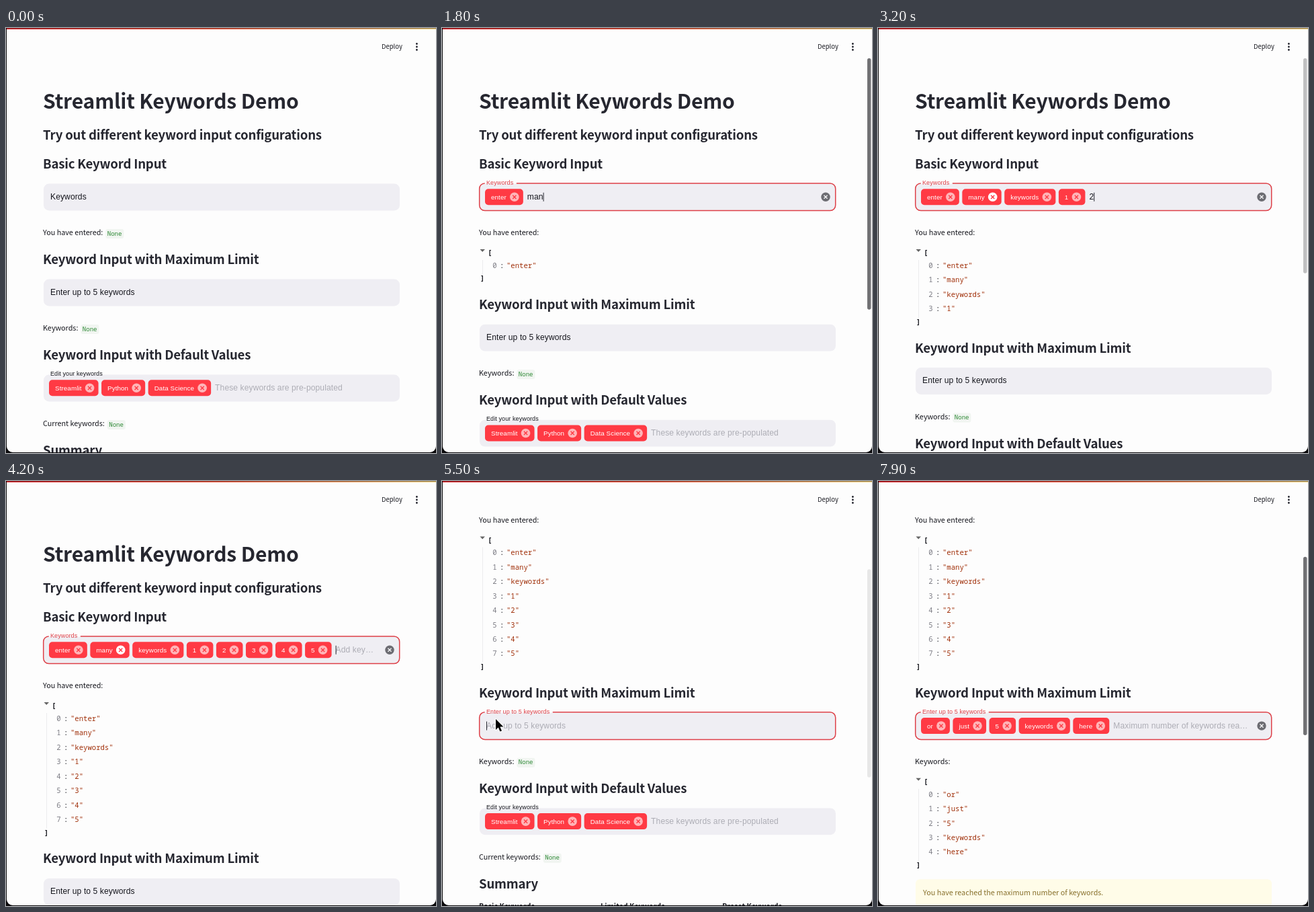
An HTML page with a canvas that plays this animation: 640x632 px, repeating every 8000 ms.

```html
<!DOCTYPE html>
<html lang="en">
<head>
<meta charset="utf-8">
<title>Keywords Demo</title>
<style>
  html, body { margin: 0; width: 100%; height: 100%; overflow: hidden; background: #000; }
  canvas { display: block; }
</style>
</head>
<body>
<canvas id="stage" width="640" height="632"></canvas>
<script>
const ctx = document.getElementById('stage').getContext('2d');
const W = 640, H = 632, LOOP = 8000;
const LEFT = 55, RIGHT = 586, ROW = 21.45;

const SANS = '"Noto Sans CJK JP", "Noto Sans CJK SC", "Noto Sans CJK KR", "Noto Sans", sans-serif';
const UI = '"Liberation Sans", Arial, sans-serif';
const MONO = '"Noto Sans Mono", "DejaVu Sans Mono", monospace';
const FONT = {
  title: ['bold 30px ' + SANS, -0.15],
  heading: ['bold 18.6px ' + SANS, -0.2],
  body: ['10.78px ' + SANS, 0],
  strong: ['bold 10.78px ' + SANS, 0],
  menu: ['9.43px ' + SANS, 0],
  input: ['12.05px ' + UI, 0.11],
  chip: ['9.8px ' + UI, 0.1],
  json: ['10.6px ' + MONO, 0],
  bracket: ['bold 10.6px ' + MONO, 0],
  code: ['9px ' + MONO, 0]
};
const INK = '#262730', DARK = '#16171e', RED = '#ff3a44', BORDER = '#dd3f47', FIELD = '#efeef3',
  HINT = '#adadb5', PAGE = '#fdfdfd';

const clamp = v => Math.min(1, Math.max(0, v));
const ease = v => { v = clamp(v); return v * v * (3 - 2 * v); };
const span = (t, from, to) => ease((t - from) / (to - from));
const mix = (a, b, p) => a + (b - a) * p;

function setFont([font, spacing]) {
  ctx.font = font;
  ctx.letterSpacing = spacing + 'px';
}
function text(str, x, y, font, color = DARK) {
  setFont(font);
  ctx.fillStyle = color;
  ctx.fillText(str, x, y);
}
function widthOf(str, font) {
  setFont(font);
  return ctx.measureText(str).width;
}
function box(x, y, w, h, r, color) {
  ctx.fillStyle = color;
  ctx.beginPath();
  ctx.roundRect(x, y, w, h, r);
  ctx.fill();
}
function cross(x, y, r, disc, mark) {
  ctx.fillStyle = disc;
  ctx.beginPath();
  ctx.arc(x, y, r, 0, 7);
  ctx.fill();
  ctx.strokeStyle = mark;
  ctx.lineWidth = 1.4;
  const d = r * 0.38;
  ctx.beginPath();
  ctx.moveTo(x - d, y - d); ctx.lineTo(x + d, y + d);
  ctx.moveTo(x + d, y - d); ctx.lineTo(x - d, y + d);
  ctx.stroke();
}

// Typing script: each word starts at a time, advances per letter, then is committed.
function script(...words) {
  const keys = [];
  for (const [word, start, step, enter] of words) {
    for (let i = 0; i < word.length; i++)
      keys.push({ at: start + i * step, text: word.slice(0, i + 1) });
    keys.push({ at: enter, text: '', chip: word });
  }
  return keys;
}
const basic = {
  label: 'Keywords', hint: 'Add keywords', focus: 250, blur: 5300,
  keys: script(['enter', 500, 95, 1130], ['many', 1560, 90, 1920], ['keywords', 2000, 55, 2450],
    ['1', 2550, 0, 2640], ['2', 3100, 0, 3230], ['3', 3310, 0, 3390],
    ['4', 3470, 0, 3550], ['5', 3630, 0, 3720])
};
const limited = {
  label: 'Enter up to 5 keywords', hint: 'Add up to 5 keywords', focus: 5250, blur: Infinity, max: 5,
  keys: script(['or', 5890, 65, 6020], ['just', 6080, 60, 6320], ['5', 6390, 0, 6950],
    ['keywords', 7080, 60, 7570], ['here', 7630, 55, 7840])
};
const preset = {
  label: 'Edit your keywords', hint: 'These keywords are pre-populated',
  focus: Infinity, blur: Infinity, keys: [], start: ['Streamlit', 'Python', 'Data Science']
};

function stateOf(field, t) {
  const past = field.keys.filter(k => k.at <= t);
  const last = past[past.length - 1];
  return {
    chips: [...(field.start || []), ...past.filter(k => k.chip).map(k => k.chip)],
    stored: past.filter(k => k.chip && k.at + 50 <= t).map(k => k.chip),
    text: last ? last.text : '',
    lastKey: last ? last.at : field.focus,
    focused: t >= field.focus && t < field.blur
  };
}

function drawChip(label, x, mid, hot) {
  const w = widthOf(label, FONT.chip) + 34;
  box(x, mid - 12, w, 24, 5, RED);
  text(label, x + 9, mid + 3.4, FONT.chip, '#fff');
  cross(x + w - 13, mid, 6.8, hot ? '#fff' : '#ffb5b8', RED);
  return x + w + 4.5;
}

function ellipsize(str, room) {
  if (widthOf(str, FONT.input) <= room) return str;
  while (str && widthOf(str + '…', FONT.input) > room) str = str.slice(0, -1);
  return str.trimEnd() + '…';
}

function drawOutline(y, labelWidth) {
  const x = 55.7, r = 8, bottom = y + 40, right = RIGHT - 0.3;
  y -= 0.6;
  ctx.strokeStyle = BORDER;
  ctx.lineWidth = 1.5;
  ctx.beginPath();
  ctx.moveTo(66 + labelWidth + 4.5, y);
  ctx.arcTo(right, y, right, bottom, r);
  ctx.arcTo(right, bottom, x, bottom, r);
  ctx.arcTo(x, bottom, x, y, r);
  ctx.arcTo(x, y, right, y, r);
  ctx.stroke();
}

function drawField(field, s, y, t) {
  const mid = y + 19.7;
  const raised = s.chips.length ? 1 : span(t, field.focus, field.focus + 200);
  box(56, y, RIGHT - 56, 39.8, 8, FIELD);

  const labelFont = [`${mix(12.05, 9.04, raised)}px ${UI}`, mix(0.11, 0.085, raised)];
  if (s.focused) drawOutline(y, widthOf(field.label, labelFont) * raised);

  let x = 64;
  s.chips.forEach((chip, i) => {
    x = drawChip(chip, x, mid, field === basic && i === 1 && t < 4600);
  });
  x += s.chips.length ? 1.5 : 2;

  const full = s.chips.length === field.max;
  const hint = full ? 'Maximum number of keywords reached' : field.hint;
  if (s.text) text(s.text, x, mid + 3.8, FONT.input);
  else if (raised > 0.5) text(ellipsize(hint, 553 - x), x, mid + 3.8, FONT.input, HINT);

  if (s.focused && !full && (t - s.lastKey) % 1000 < 500) {
    ctx.fillStyle = INK;
    ctx.fillRect(x + widthOf(s.text, FONT.input), mid - 6.5, 1, 13);
  }
  if (field !== preset && (s.chips.length || s.text)) cross(571, mid, 6.7, '#6c6c72', '#f4f4f6');
  text(field.label, 66, mix(mid + 3.6, y + 1.4, raised), labelFont, s.focused ? BORDER : DARK);
}

// Returns the extra height the list adds below its caption.
function drawResult(caption, items, base) {
  text(caption, LEFT, base, FONT.body);
  if (!items.length) {
    const x = LEFT + widthOf(caption, FONT.body) + 6.5;
    box(x - 2.5, base - 9, 27, 14, 3, '#f1f5f1');
    text('None', x, base + 0.6, FONT.code, '#2f8a37');
    return 0;
  }
  const top = base + 22;
  ctx.fillStyle = '#666';
  ctx.beginPath();
  ctx.moveTo(56.5, top - 1); ctx.lineTo(64, top - 1); ctx.lineTo(60.2, top + 3);
  ctx.fill();
  text('[', 68, base + 30, FONT.bracket);
  ctx.fillStyle = '#ececee';
  ctx.fillRect(60, base + 37, 1, items.length * ROW);
  items.forEach((item, i) => {
    const y = base + 48.8 + i * ROW;
    text(String(i), 75.3, y, FONT.json, '#7c7c84');
    text(':', 86, y, FONT.json);
    text(`"${item}"`, 96, y, FONT.json, '#a0300a');
  });
  text(']', 57, base + 46.9 + items.length * ROW, FONT.bracket);
  return 45.7 + items.length * ROW;
}

// Heading, field and result stacked; returns the baseline of the next heading.
function drawSection(title, field, caption, base, t) {
  const s = stateOf(field, t);
  text(title, LEFT, base, FONT.heading, INK);
  drawField(field, s, base + 22.6, t);
  let next = base + 142 + drawResult(caption, s.stored, base + 99);
  if (field.max && s.stored.length === field.max) {
    const y = next - 24.5;
    box(56, y, RIGHT - 56, 43, 6, '#fffce8');
    text('You have reached the maximum number of keywords.', 67, y + 24, FONT.body, '#87702c');
    next += 55;
  }
  return next;
}

// Times when the overlay scrollbar is shown before it fades out.
const BAR_SHOWN = [[1220, 3060], [3300, 3850], [4620, 5290], [6090, 6560], [7050, 9000]];

function drawScrollbar(t, scroll) {
  const shown = BAR_SHOWN.find(([from, to]) => t >= from && t < to + 250);
  if (!shown) return;
  const count = f => stateOf(f, t).stored.length;
  const content = 911 + 47.5 * count(basic) + 43 * count(limited);
  const length = H * H / content;
  const top = 2 + scroll * length / 590;
  const y = Math.max(45, top);
  ctx.globalAlpha = 1 - clamp((t - shown[1]) / 250);
  box(633, y, 5.5, top + length - y, 2.7, '#717174');
  ctx.globalAlpha = 1;
}

function drawPointer(t) {
  if (t < 4600 || t >= 5890) return;
  const p = span(t, 4650, 5200);
  ctx.save();
  ctx.translate(mix(172, 80, p), mix(250, 354, p));
  ctx.beginPath();
  for (const [x, y] of [[0, 0], [0, 16], [3.8, 12.6], [6.4, 18.6], [9, 17.5], [6.4, 11.6], [11.4, 11.4]])
    ctx.lineTo(x, y);
  ctx.closePath();
  ctx.lineJoin = 'round';
  ctx.lineWidth = 2;
  ctx.strokeStyle = '#fff';
  ctx.stroke();
  ctx.fillStyle = '#000';
  ctx.fill();
  ctx.restore();
}

function drawHeader() {
  ctx.fillStyle = PAGE;
  ctx.fillRect(0, 0, W, 45);
  const stripe = ctx.createLinearGradient(0, 0, W, 0);
  stripe.addColorStop(0, '#d9262d');
  stripe.addColorStop(0.5, '#ee5a40');
  stripe.addColorStop(1, '#f5d483');
  ctx.fillStyle = stripe;
  ctx.fillRect(0, 0, W, 2);
  ctx.fillStyle = 'rgba(0, 0, 0, 0.4)';
  ctx.fillRect(0, 0, W, 1);
  text('Deploy', 559, 31.4, FONT.menu);
  for (const y of [23.5, 28, 32.5]) box(610, y - 1.4, 2.8, 2.8, 1.4, INK);
}

function draw(t) {
  ctx.fillStyle = '#0b0a0c';
  ctx.fillRect(0, 0, W, H);
  ctx.save();
  ctx.beginPath();
  ctx.roundRect(1, 0, W - 1, H - 1, [0, 0, 9, 9]);
  ctx.clip();
  ctx.fillStyle = PAGE;
  ctx.fillRect(0, 0, W, H);

  const scroll = 246.5 * span(t, 4650, 5150);
  ctx.save();
  ctx.translate(0, -scroll);
  text('Streamlit Keywords Demo', LEFT, 119.5, FONT.title, INK);
  text('Try out different keyword input configurations', LEFT, 166, FONT.heading, INK);
  let base = drawSection('Basic Keyword Input', basic, 'You have entered:', 209, t);
  base = drawSection('Keyword Input with Maximum Limit', limited, 'Keywords:', base, t);
  base = drawSection('Keyword Input with Default Values', preset, 'Current keywords:', base, t);
  text('Summary', LEFT, base, FONT.heading, INK);
  ['Basic', 'Limited', 'Preset'].forEach((name, i) =>
    text(name + ' Keywords', LEFT + 181 * i, base + 30, FONT.strong));
  ctx.restore();

  drawHeader();
  drawScrollbar(t, scroll);
  drawPointer(t);
  ctx.restore();
}

const begin = performance.now();
function tick() {
  draw((performance.now() - begin) % LOOP);
  requestAnimationFrame(tick);
}
tick();
</script>
</body>
</html>
```
